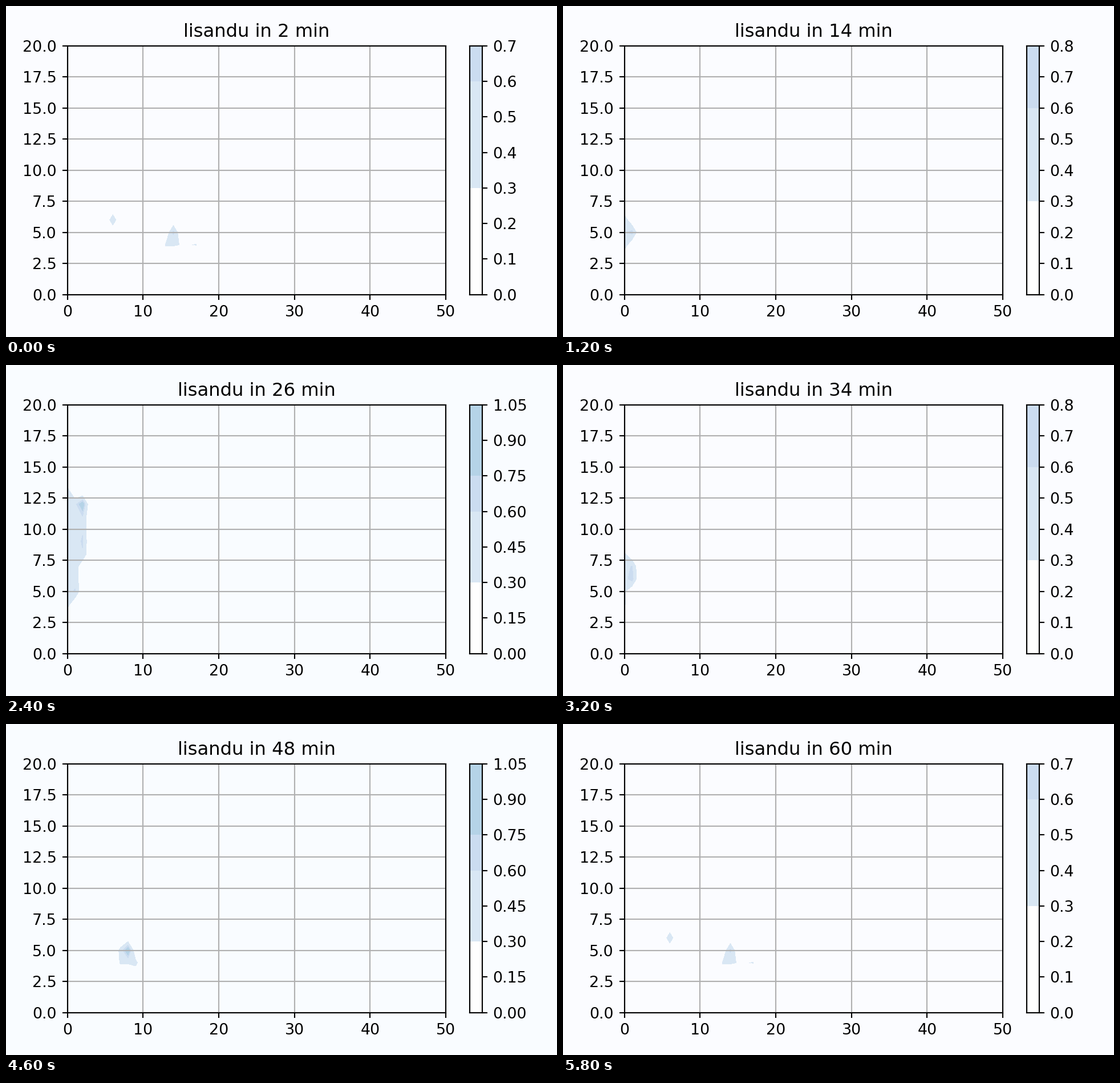
Write a matplotlib script that moves like this. It is 966 px wide and 580 px high and loops after 6000 ms.

```python
import numpy as np
import matplotlib.pyplot as plt
from matplotlib.animation import FuncAnimation
from matplotlib.ticker import MaxNLocator

W, H, DPI = 966, 580, 193.3
FRAMES, STEP = 30, 200
X, Y = np.meshgrid(np.arange(51), np.arange(21))


def spot(x, y, rate, wide=1, tall=1):
    """Even rain over a few grid points."""
    inside = (X >= x) & (X < x + wide) & (Y >= y) & (Y < y + tall)
    return np.where(inside, rate, 0.0)


def rain(*spots):
    return np.maximum.reduce(spots)


DRY = spot(0, 0, 0)
SHOWER = rain(spot(13, 4, .29, wide=5), spot(13, 4, .33, wide=2),
              spot(17, 4, .31), spot(14, 5, .66), spot(6, 6, .51))
EDGE = rain(spot(0, 4, .5, tall=3), spot(1, 5, .71))
BAND = rain(spot(0, 4, .46, tall=10), spot(0, 5, .52, wide=2, tall=8),
            spot(2, 8, .58, tall=4), spot(2, 12, .93),
            spot(2, 9, .62), spot(1, 5, .62))
REST = rain(spot(0, 4, .35, tall=5), spot(0, 6, .5, tall=2),
            spot(1, 6, .62, tall=2), spot(1, 6, .71))
CELL = rain(spot(7, 4, .33, wide=3), spot(9, 4, .4),
            spot(7, 5, .38), spot(8, 5, 1.0))

# (start, end, from, to, drift in cells per step, easing power)
STAGES = [
    (0, 4, SHOWER, DRY, 1, 1),
    (4, 6, DRY, EDGE, 0, 1),
    (6, 12, EDGE, BAND, 0, 1),
    (12, 16, BAND, REST, 0, 1),
    (16, 18, REST, DRY, 0, 1),
    (18, 19, DRY, DRY, 0, 1),
    (19, 23, DRY, CELL, 8 / 3, .5),
    (23, 29, CELL, SHOWER, 1, 3),
]


def shift(z, dx):
    """Move the rain sideways; what leaves the map is lost."""
    src = X - round(dx)
    return np.where((src >= 0) & (src <= 50), z[Y, src.clip(0, 50)], 0)


def field(n):
    a, b, old, new, v, p = next(s for s in STAGES if n <= s[1])
    w = ((n - a) / (b - a)) ** p
    return (1 - w) * shift(old, v * (n - a)) + w * shift(new, v * (n - b))


def shade(rate):
    if rate < .3:
        return "none"
    if rate < .6:
        return "#d9e7f4"
    return "#cbdcf0" if rate < .76 else "#b5d3e7"


def box(left, top, right, bottom):
    return [left / W, 1 - bottom / H, (right - left) / W, (bottom - top) / H]


fig = plt.figure(figsize=((W + .01) / DPI, (H + .01) / DPI), dpi=DPI)
ax = fig.add_axes(box(107.7, 69.7, 771, 505.6))
cax = fig.add_axes(box(813.1, 69.7, 834.9, 505.6))


def draw_bar(levels, colors):
    cax.clear()
    cax.set_facecolor("white")
    cax.set_xticks([])
    cax.yaxis.tick_right()
    cax.yaxis.set_offset_position("right")
    for lo, hi, c in zip(levels, levels[1:], colors):
        cax.axhspan(lo, hi, fc=c, ec="none", antialiased=False)
    cax.set_yticks(levels)
    cax.set_ylim(levels[0], levels[-1])


def draw(n):
    z = field(n)
    peak = z.max()
    ax.clear()
    if peak > 0:
        ticks = MaxNLocator(8, min_n_ticks=1).tick_values(0, peak)
        levels = np.round(ticks, 6)
        colors = [shade(m) for m in (levels[1:] + levels[:-1]) / 2]
        ax.contourf(z, levels=levels, colors=colors)
        paper = "#f9fcff" if peak > .8 else "#fbfcff"
    else:
        levels, colors = np.array([-2.5e-14, 0, 2.5e-14]), ["none"] * 2
        paper = "#fdfdfe"
    draw_bar(levels, colors)

    fig.set_facecolor(paper)
    ax.set_facecolor(paper)
    ax.grid(True)
    ax.set_xticks(range(0, 51, 10))
    ax.set_yticks(np.arange(0, 20.1, 2.5))
    ax.set_xlim(0, 50)
    ax.set_ylim(0, 20)
    ax.set_title(f"lisandu in {2 * (n + 1)} min")
    return []


anim = FuncAnimation(fig, draw, frames=FRAMES, init_func=lambda: [],
                     interval=STEP, repeat=True, repeat_delay=0, blit=False)
plt.show()
```
